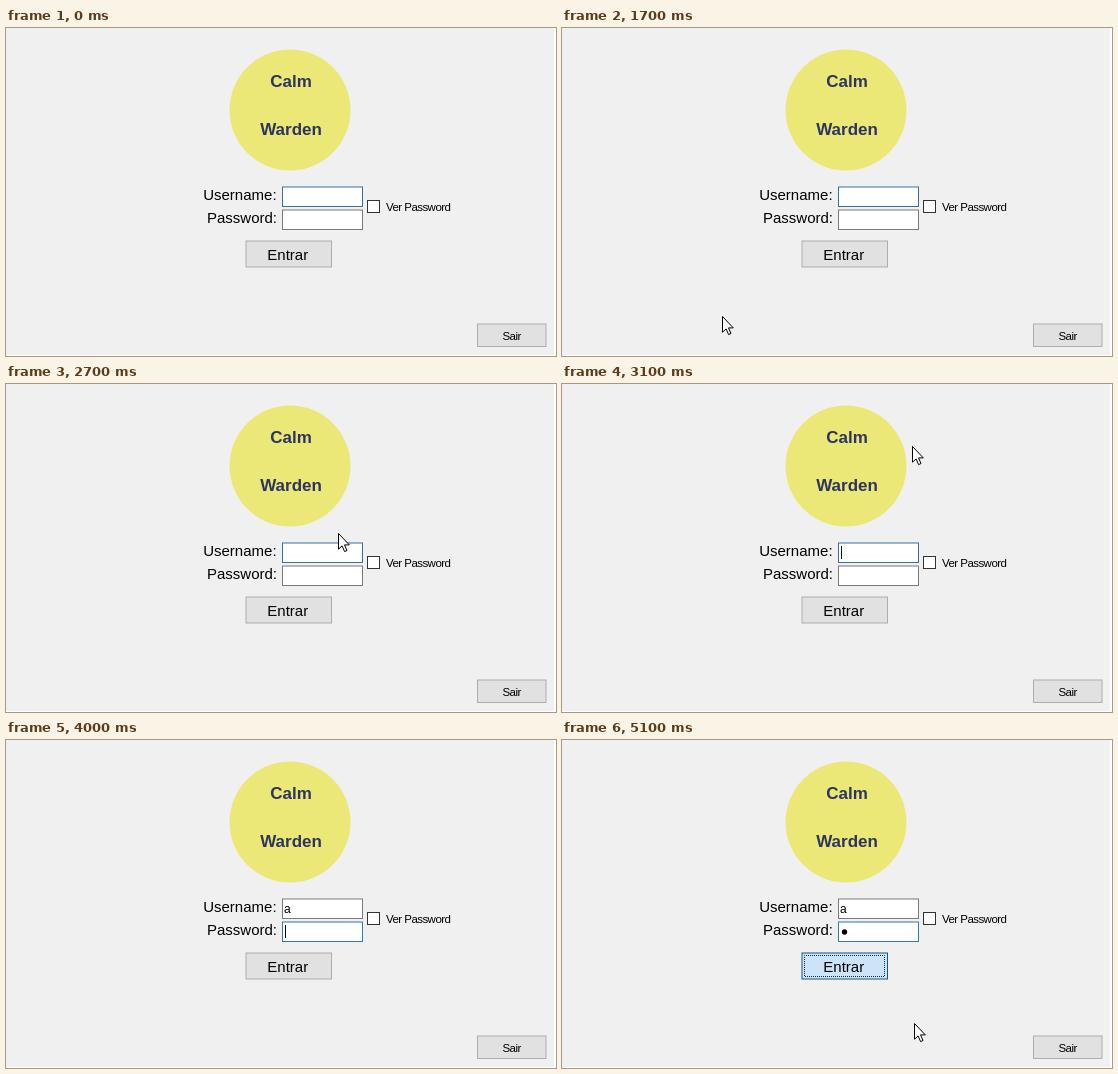
These frames come from a looping animation (550 px wide and 328 px high, 5.2 s). An HTML page:

```html
<!DOCTYPE html>
<html lang="pt">
<head>
<meta charset="utf-8">
<title>Login</title>
<style>
html, body { margin: 0; width: 100%; height: 100%; overflow: hidden; background: #f0f0f0; }
svg { display: block; width: 550px; height: 328px; }
text { font-family: "Liberation Sans", Arial, sans-serif; fill: #000; }
.label { font-size: 15px; }
.small { font-size: 11.5px; letter-spacing: -.55px; }
.brand { font-size: 17px; font-weight: bold; text-anchor: middle; fill: #2b3560; }
.button { fill: #e1e1e1; stroke: #adadad; }
.field { fill: #fff; stroke: #7a7a7a; }
</style>
</head>
<body>
<svg viewBox="0 0 550 328">
  <rect width="550" height="328" fill="#fff"/>
  <rect width="548" height="327" fill="#f0f0f0"/>

  <circle cx="284" cy="82" r="60.5" fill="#ebe877"/>
  <text class="brand" x="285" y="59">Calm</text>
  <text class="brand" x="285" y="107">Warden</text>

  <text class="label" x="197.2" y="172">Username:</text>
  <text class="label" x="201" y="195">Password:</text>
  <rect class="field" id="user" x="276.5" y="159" width="80" height="19.5"/>
  <rect class="field" id="pass" x="276.5" y="182" width="80" height="19.5"/>
  <text id="typed" x="278" y="173" font-size="12">a</text>
  <circle id="bullet" cx="282.5" cy="192" r="2.7"/>
  <rect id="caret" width="1" height="13"/>

  <rect x="361.5" y="172.5" width="12" height="12" fill="#fff" stroke="#333"/>
  <text class="small" x="380" y="182.7">Ver Password</text>

  <rect class="button" id="enter" x="240" y="213" width="85.5" height="26"/>
  <rect id="focus" x="242.5" y="215.5" width="80" height="21" fill="none" stroke="#222" stroke-dasharray="1 1" stroke-dashoffset=".5"/>
  <text class="label" x="261.3" y="232">Entrar</text>
  <rect class="button" x="471.5" y="296" width="68.5" height="22.5"/>
  <text class="small" x="496.5" y="311.7">Sair</text>

  <path id="mouse" d="M.5 .5V16.2L4.1 12.9L6.6 18.6L9 17.5L6.5 11.9H11.3Z" fill="#fff" stroke="#000"/>
</svg>
<script>
const LOOP = 5200, STEP = 100;
const $ = id => document.getElementById(id);
const show = (id, on) => $(id).setAttribute('visibility', on ? 'visible' : 'hidden');
const within = (t, spans) => spans.some(([a, b]) => t >= a && t < b);

// Each path is a list of [time, x, y]; the last entry is where it ends.
const paths = [
  [[1700, 160, 288], [2200, 320, 194], [2300, 323, 188], [2500, 326, 180], [3100, 350, 62], [3500, 350, 62]],
  [[4300, 350, 62], [4500, 347, 77], [4800, 298, 226], [4900, 298, 226], [5100, 352, 283], [5200, 352, 283]]
];
const caretOn = [[800, 1300], [1900, 2400], [2900, 3400], [3500, 4600]];
const TYPE_USER = 3500, TAB = 3900, TYPE_PASS = 4100, HOVER = 4800, CLICK = 4900;

function mouseAt(t) {
  const path = paths.find(p => t >= p[0][0] && t < p[p.length - 1][0]);
  if (!path) return null;
  const i = path.findIndex(p => p[0] > t);
  const [t0, x0, y0] = path[i - 1], [t1, x1, y1] = path[i];
  const u = (t - t0) / (t1 - t0), e = u * u * (3 - 2 * u);
  return [x0 + (x1 - x0) * e, y0 + (y1 - y0) * e].map(Math.round);
}

function render(t) {
  const inPass = t >= TAB, clicked = t >= CLICK, hot = t >= HOVER;
  $('user').style.stroke = inPass ? '#7a7a7a' : '#3a6f9c';
  $('pass').style.stroke = inPass ? '#2f7ea8' : '#7a7a7a';
  show('typed', t >= TYPE_USER);
  show('bullet', t >= TYPE_PASS);

  const filled = inPass ? t >= TYPE_PASS : t >= TYPE_USER;
  $('caret').setAttribute('x', filled ? (inPass ? 286 : 285) : 279);
  $('caret').setAttribute('y', inPass ? 185 : 162);
  show('caret', within(t, caretOn));

  $('enter').style.fill = clicked ? '#cce4f7' : hot ? '#e5f1fb' : '#e1e1e1';
  $('enter').style.stroke = clicked ? '#10568f' : hot ? '#0078d7' : '#adadad';
  show('focus', clicked);

  const pos = mouseAt(t);
  show('mouse', pos);
  if (pos) $('mouse').setAttribute('transform', `translate(${pos})`);
}

const start = performance.now();
function tick() {
  const t = (performance.now() - start) % LOOP;
  render(Math.floor(t / STEP) * STEP);
  requestAnimationFrame(tick);
}
render(0);
requestAnimationFrame(tick);
</script>
</body>
</html>
```
